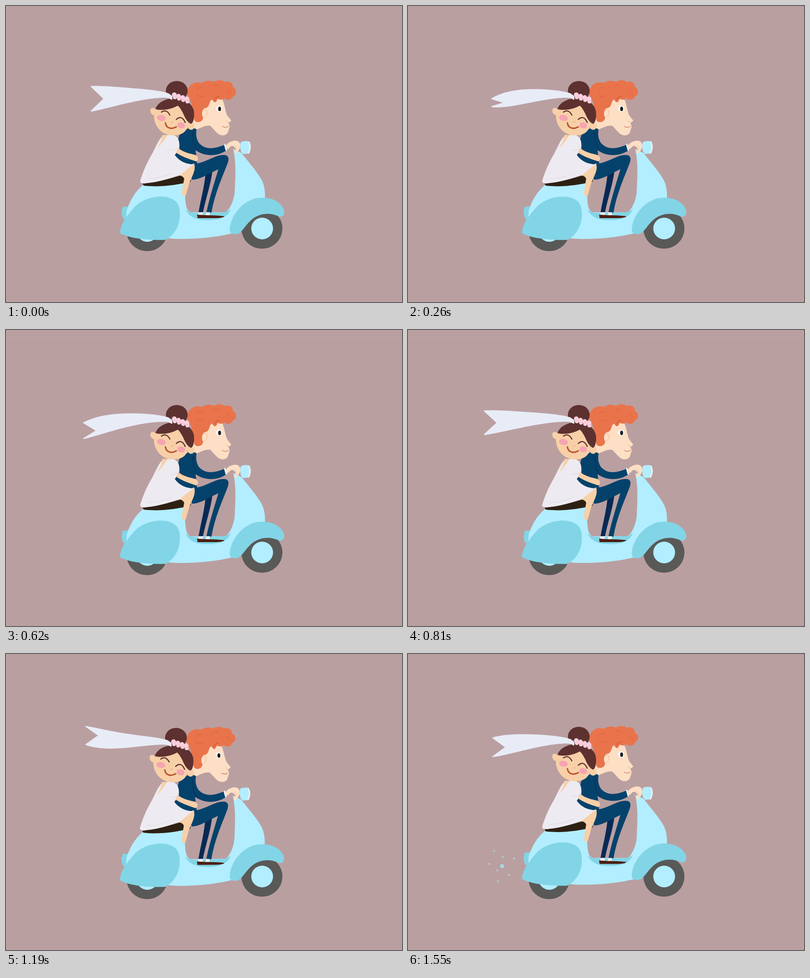
An HTML page with a canvas that plays this animation: 800x600 px, repeating every 1.65 s.

```html
<!DOCTYPE html>
<html lang="en">
<head>
<meta charset="utf-8">
<title>Scooter ride</title>
<style>
  html, body { margin: 0; width: 100%; height: 100%; overflow: hidden; background: #ba9fa1; }
  canvas { display: block; }
</style>
</head>
<body>
<canvas id="stage" width="800" height="600"></canvas>
<script>
const ctx = document.getElementById('stage').getContext('2d');
const LOOP = 1650;
const TAU = Math.PI * 2;

// Bursts of evenly spaced drawings, with a hold after each burst.
const BURSTS = [
  { from: 100, to: 620, count: 10 },
  { from: 650, to: 1120, count: 12 },
  { from: 1190, to: 1550, count: 7 }
];

// hop: body height; sink: rear suspension; tail, spread: end of the veil
const POSES = [
  { t: 0, hop: 0, sink: 0, tail: 188, spread: 25 },
  { t: 216, hop: 0, sink: 0, tail: 196, spread: 8 },
  { t: 440, hop: 4.5, sink: 0, tail: 196, spread: 14 },
  { t: 620, hop: 0, sink: 0, tail: 204, spread: 16 },
  { t: 780, hop: 0, sink: 0, tail: 188, spread: 24 },
  { t: 1035, hop: 4.5, sink: 0, tail: 165, spread: 22 },
  { t: 1120, hop: 4.5, sink: 0, tail: 155, spread: 22 },
  { t: 1310, hop: 0, sink: 1, tail: 188, spread: 10 },
  { t: 1550, hop: 4.5, sink: 0, tail: 189, spread: 19 }
];

const C = {
  bg: '#ba9fa1', light: '#b2eeff', teal: '#82d5e6', tire: '#595958', seat: '#2d2013',
  suit: '#05426b', darkSuit: '#062a55', shoe: '#4c1e10', white: '#f2f3f5',
  groom: '#fddfc5', ginger: '#e9744b', curl: '#d9603a',
  bride: '#f8d0a8', hair: '#5c312f', cheek: '#f6a4b2', lip: '#b9532f',
  dress: '#edebf1', veil: '#e8ecf7', flower: '#fcd0de', smoke: '#a6d8e4'
};

const mix = (a, b, k) => a + (b - a) * k;
const smooth = k => k * k * (3 - 2 * k);

function snap(t) {
  const burst = BURSTS.findLast(b => b.from <= t);
  if (!burst) return 0;
  const gap = (burst.to - burst.from) / (burst.count - 1);
  return Math.min(burst.to, burst.from + Math.floor((t - burst.from) / gap) * gap);
}

function poseAt(t) {
  const i = POSES.findLastIndex(pose => pose.t <= t);
  const a = POSES[i], b = POSES[i + 1];
  if (!b) return a;
  const k = smooth((t - a.t) / (b.t - a.t));
  return Object.fromEntries(Object.keys(a).map(name => [name, mix(a[name], b[name], k)]));
}

function fill(color, d) {
  ctx.fillStyle = color;
  ctx.fill(new Path2D(d));
}

function line(color, width, d) {
  ctx.strokeStyle = color;
  ctx.lineWidth = width;
  ctx.stroke(new Path2D(d));
}

function oval(color, x, y, rx, ry = rx, turn = 0) {
  ctx.fillStyle = color;
  ctx.beginPath();
  ctx.ellipse(x, y, rx, ry, turn, 0, TAU);
  ctx.fill();
}

function drawWheels() {
  for (const [x, y] of [[285, 456], [517, 451]]) {
    oval(C.tire, x, y, 41.5, 41);
    oval(C.light, x + .5, y, 22);
  }
}

function drawScooter() {
  fill(C.teal, 'M236 407 L250 406 L248 434 L237 432 Q231 420 236 407Z');
  fill(C.light, `M278 362 C260 376 250 396 244 414 L240 462 L340 472 C390 473 430 468 460 460
    L523 392 C524 375 522 362 515 350 C505 333 488 314 476 298 L459 290
    C466 320 463 350 462 378 C460 396 452 412 444 418 L372 418 C362 412 362 400 361 350 L376 345Z`);
  fill(C.teal, `M362 412 C370 420 380 419 395 419 L440 418 Q450 416 454 411
    C450 428 430 434 410 434 C385 435 370 428 362 412Z`);
  fill(C.light, 'M474 277 Q477 273 490 274 Q497 286 491 299 L479 300 Q471 294 474 277Z');
  line(C.white, 2.5, 'M491 276 Q496 286 490 298');
}

function drawGuards() {
  fill(C.teal, `M230 460 C232 440 244 425 262 405 C285 384 325 380 343 396 C354 406 353 432 347 446
    C342 459 331 470 322 474 C290 475 250 472 230 460Z`);
  fill(C.teal, `M452 454 C453 430 470 402 500 391 C530 383 557 396 562 415 C563 424 558 428 552 427
    C534 418 515 420 500 430 C485 441 480 455 470 461 C460 465 452 461 452 454Z`);
}

function drawGroom() {
  fill(C.darkSuit, 'M403 340 L417 335 C413 365 403 392 398 418 L389 418 C394 390 401 365 403 340Z');
  fill(C.groom, `M385 200 L435 185 C443 200 442 212 447 222 L455 232 Q453 236 449 236 L452 244
    L448 257 C442 265 432 263 426 257 L413 243 C404 241 395 246 384 251 L376 246 L378 230Z`);
  fill(C.suit, `M350 262 C358 250 375 243 385 250 C383 262 385 270 390 278 C405 294 425 288 442 281
    L445 293 C425 306 400 305 383 292 L386 319 C405 316 425 301 440 302 C450 302 451 309 448 318
    C438 345 422 378 415 419 L405 418 C412 385 422 355 429 331 C405 342 392 352 376 352
    L365 325 L340 305Z`);
  line(C.darkSuit, 1, 'M377 256 C378 275 381 286 387 294');
  fill(C.white, 'M389 418 L398 418 L397 425 L388 425Z M405 418 L412 418 L411 425 L403 425Z');
  fill(C.shoe, 'M386 423 L402 424 Q425 424 441 426 Q441 429 425 430 L387 430Z');
  line(C.white, 3, 'M442 281 L445 292');
  fill(C.groom, `M444 283 C450 275 462 270 470 275 C476 281 474 292 463 300 Q459 299 464 289
    C459 282 454 282 450 289 L446 290Z`);
  line('#f0c6a3', 1, 'M461 282 Q468 284 465 292');

  fill(C.ginger, `M366 180 C366 158 382 152 396 156 C404 150 414 151 420 154 C428 148 438 150 441 154
    C451 151 459 156 458 164 C467 167 467 180 459 183 C455 192 445 192 441 187
    C435 193 430 188 427 189 C424 200 418 194 416 188 C410 194 412 205 403 207
    C396 214 402 224 396 232 C390 238 380 236 380 228 C374 212 380 200 366 180Z`);
  line(C.curl, 1, `M386 170 q5 -8 12 -3 M400 182 q-12 6 -14 -3 M418 163 q8 -6 13 1
    M446 170 q8 1 7 8`);
  line(C.curl, 2, 'M421 191 Q424 183 431 183');
  oval(C.groom, 402, 217, 6, 10, .15);
  line('#efc09c', 1.2, 'M399 211 Q407 208 406 217 Q405 223 401 224');
  oval('#fff', 430.5, 208, 6, 6);
  oval('#17191d', 431.5, 208.5, 3, 4.5);
  line('#f1c4a0', 1.2, 'M445 232 Q447 237 451 236');
  line('#cf8060', 1.5, 'M437 244 Q443 248 449 244');
}

function drawBrideBody() {
  fill(C.seat, 'M276 360 C300 356 335 350 360 341 L375 344 L373 356 C345 363 310 368 278 364Z');
  fill(C.bride, `M346 344 C356 336 366 324 380 319 C385 333 374 348 370 360 L363 384
    Q358 389 355 379 L360 350 C357 344 352 343 346 344Z`);
  fill(C.dress, `M318 262 C308 270 303 285 295 300 C283 320 276 338 271 355
    Q271 361 285 359 C308 357 335 349 354 341 C362 333 371 327 379 321
    C365 321 350 315 341 302 L350 290 C352 272 347 263 335 261Z`);
  fill(C.bride, 'M316 261 L326 262 C320 272 313 281 306 288 C311 278 316 270 316 261Z');
  line('#dcd8e3', 1, 'M333 292 Q344 295 349 286 M286 350 Q310 350 335 339');
  fill(C.bride, `M348 288 C358 297 372 299 383 302 C390 306 389 314 384 315
    C369 310 355 305 343 297Z`);
}

function drawBrideHead() {
  oval(C.hair, 345, 172, 22, 20);
  oval(C.bride, 298, 214, 6, 8, -.5);
  oval(C.bride, 374, 243, 7, 8);
  fill(C.bride, `M302 208 C320 207 335 203 347 200 C358 209 371 224 368 242 C364 258 350 264 333 262
    C312 260 298 240 299 222Z`);
  fill(C.hair, `M302 209 C307 193 327 186 345 187 C370 190 381 205 380 220 C380 230 378 236 374 239
    C367 236 362 228 358 218 C354 210 350 204 347 202 C335 209 315 213 302 209Z`);
  oval(C.cheek, 314, 227, 9, 6, .2);
  oval(C.cheek, 354, 242, 8, 6, .3);
  line(C.hair, 2.3, 'M314 215 Q324 208 331 221 M344 230 Q355 220 362 236');
  line('#eab58c', 1.5, 'M333 235 Q336 237 338 234');
  line(C.lip, 3, 'M322 237 C324 249 335 250 344 245');
}

// A ribbon that widens away from the hair and ends in a swallowtail.
function drawVeil(t, { hop, sink, tail, spread }) {
  const rootX = 335 - 5 * sink, rootY = 186 - hop + 3 * sink;
  const tipX = 163 + 9 * Math.cos(TAU * t / LOOP);
  const edge = (u, side) => {
    const middle = rootY - 7 * Math.sin(Math.PI * Math.sqrt(u)) + (tail - rootY) * u ** 3;
    const half = mix(3 + 19 * u, spread, u ** 4);
    ctx.lineTo(mix(rootX, tipX, u), middle + side * half);
  };
  ctx.beginPath();
  for (let i = 0; i <= 24; i++) edge(i / 24, -1);
  ctx.lineTo(tipX + 26, tail);
  for (let i = 24; i >= 0; i--) edge(i / 24, 1);
  ctx.closePath();
  ctx.fillStyle = ctx.strokeStyle = C.veil;
  ctx.lineWidth = 2;
  ctx.fill();
  ctx.stroke();
}

function drawFlowers() {
  for (let i = 0; i < 4; i++) {
    const x = 340 + 8.5 * i, y = 180 + 2.8 * i;
    oval(C.flower, x, y, 4.8);
    oval(C.flower, x + 1, y + 5, 4);
    line('#f3b3c8', 1, `M${x} ${y + 3} l4 1`);
  }
}

// Puffs gather in a trailing cloud, then scatter as droplets.
function drawSmoke(t) {
  if (t < 1190) return;
  const gather = Math.min(1, (t - 1190) / 120);
  const scatter = Math.max(0, (t - 1310) / 240);
  for (let i = 0; i < 8; i++) {
    const angle = i * 2.4, reach = 13 * Math.sqrt(i);
    const x = mix(215 - 5 * i, 190 + reach * Math.cos(angle), scatter);
    const y = mix(413 + 2.4 * i + 4 * Math.cos(i * 2), 430 + reach * Math.sin(angle), scatter);
    const r = mix(9 - i * .5, i ? 1.8 : 4, scatter);
    oval(C.smoke, mix(238, x, gather), mix(421, y, gather), r * mix(.4, 1, gather));
  }
}

function onBody({ hop, sink }, paint) {
  ctx.save();
  ctx.translate(517 - .5 * sink, 451 - hop);
  ctx.rotate(-.017 * sink);
  ctx.translate(-517, -451);
  paint();
  ctx.restore();
}

function draw(t) {
  const pose = poseAt(t);
  ctx.fillStyle = C.bg;
  ctx.fillRect(0, 0, 800, 600);
  ctx.strokeStyle = '#bea4a6';
  ctx.lineWidth = 1;
  ctx.strokeRect(.5, 14.5, 799, 570);

  drawWheels();
  drawSmoke(t);
  onBody(pose, () => {
    drawScooter();
    drawGroom();
    drawBrideBody();
    drawGuards();
    drawBrideHead();
  });
  drawVeil(t, pose);
  onBody(pose, drawFlowers);
}

ctx.lineCap = ctx.lineJoin = 'round';
const start = performance.now();
function tick() {
  draw(snap((performance.now() - start) % LOOP));
  requestAnimationFrame(tick);
}
tick();
</script>
</body>
</html>
```
